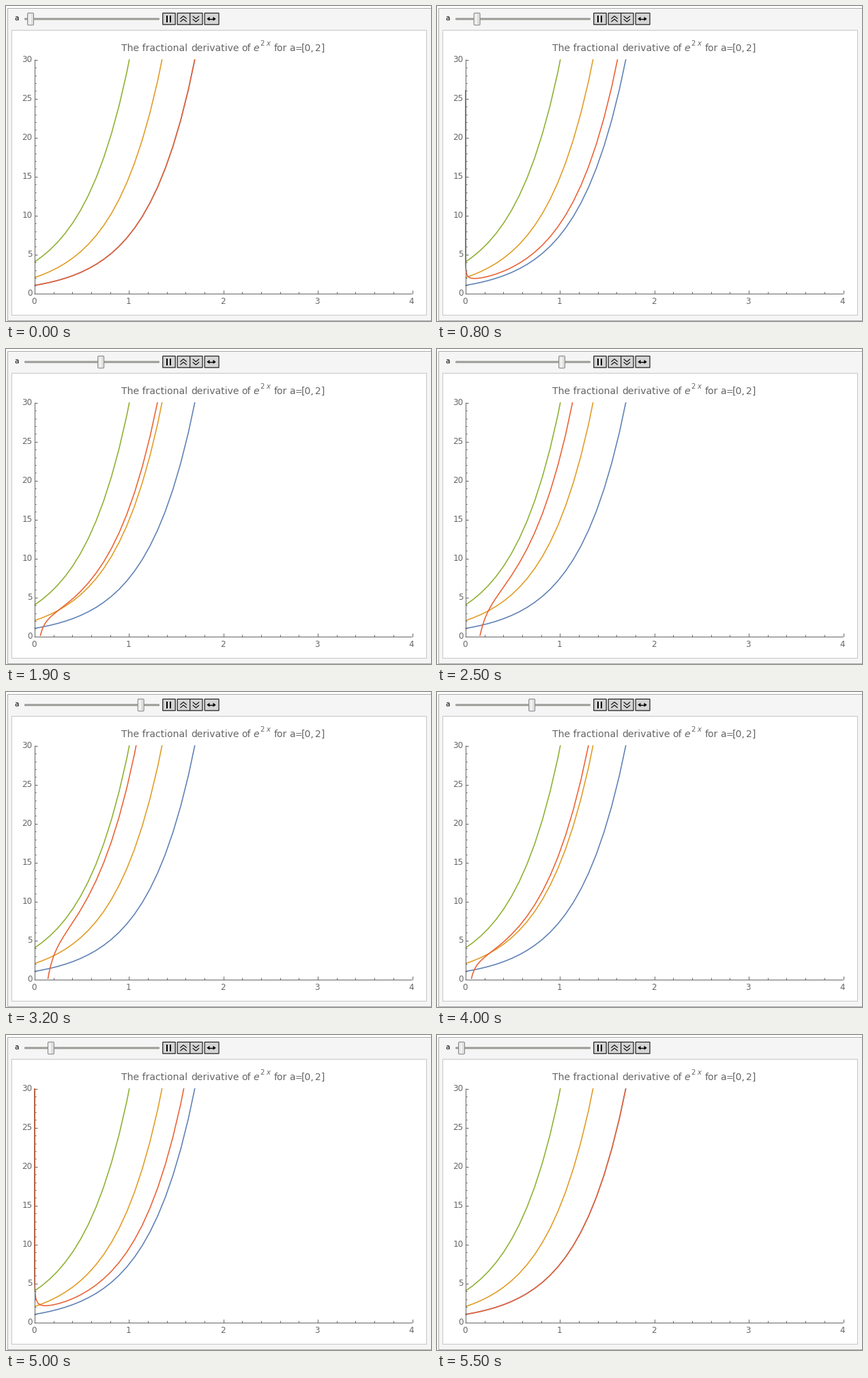
A matplotlib script for the animation above (6 s loop, 623x461 px).

```python
import math

import numpy as np
import matplotlib.pyplot as plt
from matplotlib.animation import FuncAnimation
from matplotlib.patches import FancyBboxPatch, Polygon, Rectangle

W, H, DPI = 623, 461, 64
PX = 72 / DPI                      # one pixel in points
FRAMES, STEP_MS = 60, 100
X0, Y0, SX, SY = 41.6, 420.3, 138.35, 11.4
GREY = "#666666"
BLUE, ORANGE, GREEN, RED = "#5e81b5", "#e19c24", "#8fb032", "#eb6235"

plt.rcParams["font.family"] = "DejaVu Sans"
fig = plt.figure(figsize=(W / DPI, H / DPI), dpi=DPI, facecolor="white")
ax = fig.add_axes([0, 0, 1, 1])
ax.set_xlim(0, W)
ax.set_ylim(H, 0)
ax.axis("off")


def box(x0, y0, x1, y1, fill, edge="none", z=1, width=1.0, snap=None):
    return ax.add_patch(Rectangle((x0, y0), x1 - x0, y1 - y0, facecolor=fill,
                                  edgecolor=edge, linewidth=width * PX,
                                  zorder=z, snap=snap))


def stroke(xs, ys, color, width=1.0, z=4):
    line, = ax.plot(xs, ys, color=color, lw=width * PX, zorder=z,
                    solid_capstyle="butt", solid_joinstyle="round")
    return line


def label(x, y, s, size, color=GREY, ha="left", style="normal"):
    ax.text(x, y, s, fontsize=size * PX, color=color, ha=ha, va="baseline",
            style=style, zorder=6)


def px(x):
    return X0 + SX * np.asarray(x)


def py(y):
    return Y0 - SY * np.asarray(y)


def mid_pixel(v):
    return math.floor(v) + 0.5


def draw_panel():
    box(1.5, 2.5, 622.5, 459.5, "#f5f5f5", "#ababab")
    box(7.5, 34.5, 615.5, 451.5, "white", "#c6c6c6")


def draw_controls():
    label(12.7, 21, "a", 10.5, "black")
    ax.add_patch(FancyBboxPatch((28, 18.5), 196, 1, zorder=2, linewidth=0,
                                boxstyle="round,pad=1,rounding_size=1",
                                facecolor="#9b9b97"))
    for x0, x1 in ((229.8, 248.2), (251.2, 269.7), (269.7, 288), (291.2, 312)):
        box(x0, 10.4, x1, 27.2, "#d5d5d5", "#2b2b2b", 2, 1.3, False)
    for x in (235, 240):
        box(x, 14, x + 2, 24, "black", z=3)
    for cx, d in ((260.1, 1), (278.4, -1)):
        for cy in (16.7, 21.2):
            stroke([cx - 4.7, cx, cx + 4.7],
                   [cy + 2 * d, cy - 2 * d, cy + 2 * d], "black", 1.1)
    stroke([296.5, 305.5], [18.8, 18.8], "black", 1.4)
    for tip, d in ((294.3, 1), (307.7, -1)):
        ax.add_patch(Polygon([(tip, 18.8), (tip + 4.2 * d, 15.8),
                              (tip + 4.2 * d, 21.8)], color="black",
                             linewidth=0, zorder=4))


def draw_axes():
    left, bottom = mid_pixel(X0), mid_pixel(Y0)
    stroke([left, left], [78, 421], GREY, z=5)
    stroke([41, 595], [bottom, bottom], GREY, z=5)
    for k in range(31):
        y = mid_pixel(py(k))
        major = k % 5 == 0
        stroke([left, left + (4.5 if major else 2.5)], [y, y], GREY, z=5)
        if major:
            label(38.7, py(k) + 4.1, str(k), 12, ha="right")
    for k in range(21):
        x = mid_pixel(px(k / 5))
        major = k % 5 == 0
        stroke([x, x], [bottom, bottom - (4.5 if major else 2.5)], GREY, z=5)
        if major:
            label(px(k / 5) - 0.7, 435.5, str(k // 5), 12, ha="center")


def draw_title():
    base = 66
    label(169, base, "The fractional", 14)
    label(271, base, "derivative", 14)
    label(345, base, "of", 14)
    label(362.3, base, "e", 14, style="italic")
    label(371.8, 58.5, "2", 10)
    label(381, 58.5, "x", 10, style="italic")
    label(393, base, "for", 14)
    label(415.5, base, "a", 14)
    label(423.5, base, "=", 12.5)
    label(432.9, base, "[0,", 14)
    label(453, base, "2]", 14)


def frac_exp(x, a):
    """Riemann-Liouville derivative of order a of exp(2x), as a series."""
    y = sum(2.0 ** n * x ** (n - a) / math.gamma(n + 1 - a) for n in range(40))
    return np.clip(y, -60, 90)


def order(i):
    """Order a: holds at 0, rises to nearly 2, then mirrors back."""
    i = min(i, FRAMES - 1 - i)
    return max(0.0, 0.8 * (6 * i / (FRAMES - 1) - 0.5))


draw_panel()
draw_controls()
draw_axes()
draw_title()

clip = Rectangle((41, 78), 554, 342, transform=ax.transData)
grid = np.linspace(0, 4, 50)[:23]
for power, color in enumerate((BLUE, ORANGE, GREEN)):
    curve = stroke(px(grid), py(2 ** power * np.exp(2 * grid)), color, 1.6, 3)
    curve.set_clip_path(clip)

fine = np.concatenate([np.geomspace(1e-6, grid[1], 90),
                       np.linspace(grid[1], grid[6], 50)[1:], grid[7:]])
red = stroke(px(fine), py(frac_exp(fine, 0)), RED, 1.6, 4)
red.set_clip_path(clip)

# Slider thumb: a rounded body with lighter and darker strips inside
body = FancyBboxPatch((-4, 10.7), 8, 16.8, boxstyle="round,pad=0.5,rounding_size=1.5",
                      facecolor="#dedede", edgecolor="#858585",
                      linewidth=PX, zorder=7)
ax.add_patch(body)
strips = [(dx, box(dx, 11.5, dx + 2, 26.5, c, z=8))
          for dx, c in ((-3.5, "#ececec"), (-1.5, "#f3f3f3"), (0.5, "#dddddd"))]


def update(i):
    a = order(i)
    red.set_ydata(py(frac_exp(fine, a)))
    cx = 36 + 90 * a
    body.set_x(cx - 4)
    for dx, strip in strips:
        strip.set_x(cx + dx)
    return [red, body] + [strip for _, strip in strips]


anim = FuncAnimation(fig, update, frames=FRAMES, interval=STEP_MS,
                     repeat=True, repeat_delay=0, blit=False)
plt.show()
```
